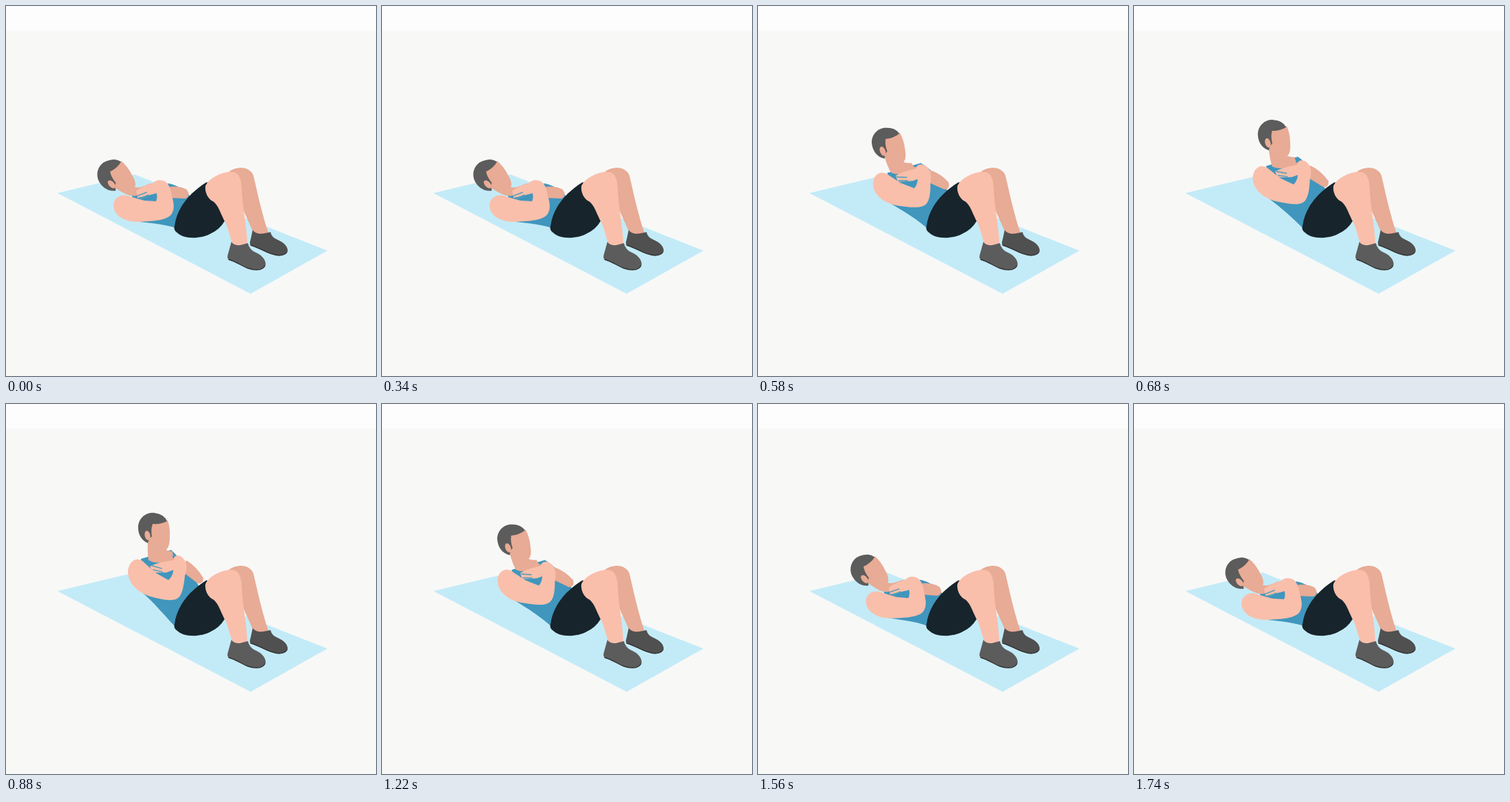
An HTML page for the animation above (1760 ms loop, 540x540 px).

```html
<!DOCTYPE html>
<html lang="en">
<head>
<meta charset="utf-8">
<title>Sit-up</title>
<style>
  html, body { margin: 0; width: 100%; height: 100%; overflow: hidden; background: #f8f8f7; }
  svg { display: block; width: 100%; height: 100%; }
  .skin { fill: #f9bfab; }
  .shade { fill: #e8ab95; }
  .shirt { fill: #4096bd; }
  .hair { fill: #5c5c5c; }
  .shorts { fill: #17242b; }
  .line { fill: none; stroke: #5f9fb6; stroke-width: 1.7; stroke-linecap: round; }
  .sole { fill: none; stroke: #333; stroke-width: 1.4; stroke-linecap: round; }
</style>
</head>
<body>
<svg viewBox="0 0 540 540">
  <rect width="540" height="540" fill="#f8f8f7"/>
  <rect width="540" height="36" fill="#fdfdfd"/>
  <path fill="#c3ebf7" d="M75 273L188 246L469 357L357 420Z"/>

  <g id="trunk"></g>

  <path class="shade" d="M325 242C338 233 355 234 361 247C366 268 373 302 383 331Q372 337 362 333C355 316 346 300 338 275Z"/>
  <path fill="#505050" d="M360 327Q365 334 376 332L386 330Q388 338 396 341C406 345 412 352 411 358Q408 364 398 364C382 363 374 354 357 349Q355 346 357 341Z"/>
  <path class="sole" d="M357 349C374 354 382 363 398 364Q407 364 410 359"/>
  <path class="shorts" d="M293 257C272 270 250 291 246 321Q244 327 250 331C260 341 285 340 299 332Q312 326 319 314L304 270Z"/>
  <path class="skin" d="M291 263C294 253 313 243 326 242C339 241 343 250 344 265C345 295 352 322 352 346Q342 352 331 348C326 335 323 319 318 312C312 300 309 288 300 284C294 280 290 271 291 263Z"/>
  <path fill="#5c5c5c" d="M329 344Q332 350 342 349L353 346Q355 355 363 359C373 363 379 370 379 377Q376 385 366 385C349 385 342 375 325 370Q322 367 324 362Z"/>
  <path class="sole" d="M325 370C342 375 349 385 366 385Q375 385 378 379"/>

  <g id="head">
    <path class="shade" d="M208 174L236 170Q240 181 239 195C239 207 236 214 229 214Q218 213 209 201Z"/>
    <path class="hair" d="M207 203C196 198 192 188 193 177C195 164 207 157 217 159Q231 161 235 171Q226 176 214 175Q211 184 213 193L209 197Z"/>
    <ellipse class="shade" cx="206.500" cy="192" rx="4" ry="7" transform="rotate(-12 206 192)"/>
  </g>
  <g id="arms"></g>
</svg>

<script>
const SVG = 'http://www.w3.org/2000/svg';
const LOOP = 1760;
const HIP = { x: 260, y: 310 };

// Each part: [layer, class, lying path, raised path]
const PARTS = [
  ['trunk', 'shirt',
    'M184 276L237 259Q255 262 270 279L262 330C240 318 216 318 188 314Z',
    'M197 226L241 213Q254 224 282 266L246 324C230 307 216 290 200 276Z'],
  ['trunk', 'shade',
    'M157 264L184 262Q191 268 203 262L211 265Q197 281 179 276Q170 273 157 264Z',
    'M207 197L231 207Q230 214 243 215L244 222Q225 237 208 228Q206 217 207 197Z'],
  ['arms', 'shade',
    'M238 264Q253 262 264 268Q270 277 262 281L236 280Z',
    'M263 228Q278 237 288 254Q288 263 280 262L258 245Z'],
  ['arms', 'shade',
    'M203 262Q213 256 225 261L222 268Q209 271 203 262Z',
    'M218 228Q230 218 244 224L244 232Q229 237 218 228Z'],
  ['arms', 'skin',
    'M190 270Q200 262 216 258L234 267L217 274L192 280Z',
    'M210 237Q222 231 243 228L250 240L234 246L214 246Z'],
  ['arms', 'skin',
    'M157 291C157 280 168 273 181 278Q191 281 202 284L219 285Q223 276 216 266C210 257 220 252 230 255Q239 258 242 277Q247 294 243 301C239 313 215 314 195 315C174 316 157 306 157 291Z',
    'M178 243C180 229 190 223 199 229Q207 236 216 245L237 257Q246 249 244 236C242 222 249 218 256 223Q268 232 261 251Q259 273 254 280C248 290 229 286 211 281C191 275 177 260 178 243Z'],
  ['arms', 'line',
    'M192 277L205 272M196 281L207 276',
    'M213 236L227 240M215 242L228 245']
];

const parts = PARTS.map(([layer, type, lying, raised]) => {
  const node = document.createElementNS(SVG, 'path');
  node.setAttribute('class', type);
  document.getElementById(layer).append(node);
  return { node, lying, raised };
});
const head = document.getElementById('head');

const mix = (a, b, p) => a + (b - a) * p;
const easeOut = t => Math.sin(Math.min(1, Math.max(0, t)) * Math.PI / 2);

// Swing a point around the hip, blending angle and distance.
function swing(x0, y0, x1, y1, p) {
  const dx0 = x0 - HIP.x, dy0 = y0 - HIP.y, dx1 = x1 - HIP.x, dy1 = y1 - HIP.y;
  const turn = Math.atan2(dx0 * dy1 - dy0 * dx1, dx0 * dx1 + dy0 * dy1);
  const angle = Math.atan2(dy0, dx0) + turn * p;
  const reach = mix(Math.hypot(dx0, dy0), Math.hypot(dx1, dy1), p);
  return [HIP.x + reach * Math.cos(angle), HIP.y + reach * Math.sin(angle)];
}

function blendPath(lying, raised, p) {
  const ends = raised.match(/\d+/g);
  let i = 0;
  return lying.replace(/(\d+) (\d+)/g, (_, x, y) =>
    swing(+x, +y, +ends[i++], +ends[i++], p).map(v => v.toFixed(2)).join(' '));
}

function lift(ms) {
  return ms < 1100 ? easeOut((ms - 352) / 508) : 1 - easeOut((ms - 1100) / 588);
}

function draw(now) {
  const p = lift(now % LOOP);
  for (const { node, lying, raised } of parts) node.setAttribute('d', blendPath(lying, raised, p));
  const [x, y] = swing(155, 247, 214, 181, p);
  head.setAttribute('transform', `translate(${x} ${y}) rotate(${mix(-31, 0, p)}) translate(-214 -181)`);
  requestAnimationFrame(draw);
}
draw(performance.now());
</script>
</body>
</html>
```
